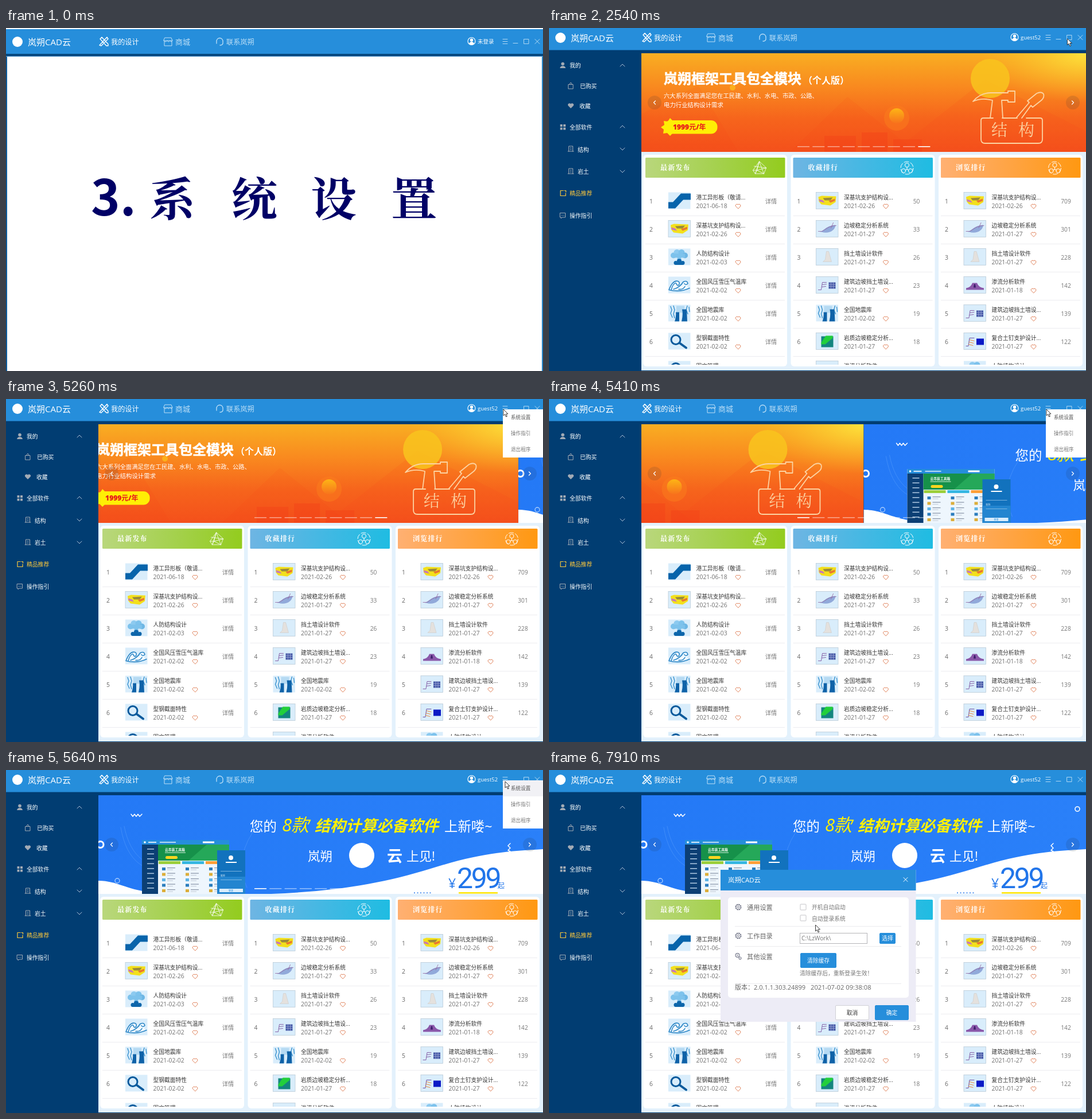
Recreate the animation shown at these times as an HTML page. Size 936 by 598 pixels, loop 7.99 s.

```html
<!DOCTYPE html>
<html lang="zh-CN">
<head>
<meta charset="utf-8">
<title>系统设置</title>
<style>
html, body { margin: 0; width: 100%; height: 100%; overflow: hidden; background: #fff; }
svg { display: block; font-family: "Open Sans", "Noto Sans CJK SC", sans-serif; }
.song { font-family: "Noto Serif CJK SC", "Noto Sans CJK SC", serif; }
.line { fill: none; stroke-linecap: round; stroke-linejoin: round; }
</style>
</head>
<body>
<svg id="stage" width="936" height="598" viewBox="0 0 936 598"></svg>
<script>
const LOOP = 7990, BRAND = '岚朔', BLUE = '#268edb', NAVY = '#013d72', PALE = '#bfe0f7';

const text = (x, y, s, size, fill, extra = '') =>
  `<text x="${x}" y="${y}" font-size="${size}" fill="${fill}" ${extra}>${s}</text>`;
const rect = (x, y, w, h, fill, extra = '') =>
  `<rect x="${x}" y="${y}" width="${w}" height="${h}" fill="${fill}" ${extra}/>`;
const disc = (x, y, r, fill, extra = '') => `<circle cx="${x}" cy="${y}" r="${r}" fill="${fill}" ${extra}/>`;
const ring = (x, y, r, color, w = 1) => disc(x, y, r, 'none', `stroke="${color}" stroke-width="${w}"`);
const area = (d, fill, extra = '') => `<path d="${d}" fill="${fill}" ${extra}/>`;
const line = (d, color, w = 1) => `<path class="line" d="${d}" stroke="${color}" stroke-width="${w}"/>`;
const group = (id, body) => `<g id="${id}">${body}</g>`;
const at = (x, y, body) => `<g transform="translate(${x} ${y})">${body}</g>`;
const clip = (x, y, w, h, body) => `<svg x="${x}" y="${y}" width="${w}" height="${h}" viewBox="${x} ${y} ${w} ${h}">${body}</svg>`;
const gradient = (id, stops, dir = 'x2="1" y2="0"') => `<linearGradient id="${id}" ${dir}>` +
  stops.map((c, i) => `<stop offset="${i / (stops.length - 1)}" stop-color="${c}"/>`).join('') + '</linearGradient>';
const MID = 'text-anchor="middle"', BOLD = 'font-weight="700"', MEDIUM = 'font-weight="500"', BLACK = 'font-weight="900"';

const defs = '<defs>' +
  gradient('h0', ['#b9d77c', '#a5d14f', '#93cc1e']) +
  gradient('h1', ['#6eb5e3', '#45b8e3', '#1fbce2']) +
  gradient('h2', ['#ffb072', '#ffa443', '#ff9811']) +
  gradient('sunset', ['#f9ae22', '#f98a1f', '#f6641c', '#f4501b'], 'x2="0" y2="1"') +
  gradient('sea', ['#2479f6', '#2a80f9']) +
  gradient('ball', ['#fdb515', '#f7741c'], 'x2="0" y2="1"') +
  `<radialGradient id="glow" cx="1" cy="0" r=".5"><stop stop-color="#fde23c"/>
   <stop offset="1" stop-color="#fbc52a" stop-opacity="0"/></radialGradient></defs>`;

// Title bar, shared by both scenes
const header = user =>
  disc(20, 17, 9, '#fff') +
  text(38, 23, BRAND + 'CAD云', 15, '#fff', MEDIUM) +
  line('M164 12L167 9L178 21V24H175ZM163 23L176 9L178 12L166 24Z', '#fff', 1.4) +
  text(183, 21.5, '我的设计', 12.2, '#fff', MEDIUM) +
  line('M277 10H288L290 15H275ZM276 16V24H289V16M275 15Q278 19 281 15Q283 19 286 15Q288 19 290 15', PALE) +
  text(295, 21.5, '商城', 13, PALE) +
  line('M367 18V16A5.5 5.5 0 0 1 378 16V18M367 15V20M378 15V20Q377 23 373 23', PALE, 1.3) +
  text(384, 21.5, '联系' + BRAND, 12.2, PALE) +
  ring(811.5, 16, 6.5, '#fff', 1.2) + disc(811.5, 14, 2.7, '#fff') + area('M807 21Q808 17 811.5 17T816 21Q811 24 807 21', '#fff') +
  text(822, 20, user, 9.5, '#fff') +
  line('M866 12.5H874M866 16.5H874M866 20.5H874M884 19.5H892M903 12.5H911V20.5H903ZM922 12.5L930 20.5M930 12.5L922 20.5', PALE, .9);

const INDIGO = '#000066';
const intro = rect(0, 0, 936, 598, '#fff') + rect(0, 2, 936, 43, BLUE) + rect(0, 45, 936, 4, '#04487f') +
  rect(0, 49, 2, 549, '#0d5c9c') + rect(934, 49, 2, 549, '#2b86c8') + rect(0, 49, 936, 1, '#5b9dd0') +
  at(0, 7, header('未登录')) +
  text(148, 327, '3.', 86, INDIGO, `${BOLD} style="font-family:'Noto Sans CJK SC',sans-serif"`) +
  [...'系统设置'].map((c, i) => text([290, 433, 571, 711][i], 327, c, 80, INDIGO, `${MID} font-weight="600" class="song"`)).join('');

// Sidebar
const chevron = (y, up) => line(up ? `M124 ${y + 2}L128 ${y - 2}L132 ${y + 2}` : `M124 ${y - 2}L128 ${y + 2}L132 ${y - 2}`, '#a9c0d5');
const GREY = '#a3abb5', GOLD = '#ffc83c';
const building = y => line(`M34.5 ${y + 4}V${y - 5}H41.5V${y + 4}M33 ${y + 4}H43M37 ${y - 2}H39M37 ${y + 1}H39`, GREY);
const sidebar = rect(0, 38, 936, 560, NAVY) +
  [[36, 65, '我的'], [54, 101, '已购买'], [53, 136, '收藏'], [36, 173, '全部软件'], [50, 212, '结构'],
   [50, 250, '岩土'], [36, 288, '精品推荐', GOLD], [36, 327, '操作指引']]
    .map(([x, y, s, c = '#fff']) => text(x, y + 3.5, s, 9.8, c, MEDIUM)).join('') +
  chevron(65, true) + chevron(172, true) + chevron(211) + chevron(250) +
  disc(24, 62.5, 2.8, GREY) + area('M19 70Q20 66 24 66T29 70Z', GREY) +
  line('M34 98.5H42V106H34ZM36 98Q38 92 40 98', GREY) +
  area('M38 140L33.5 135.5A2.6 2.6 0 0 1 38 132.5A2.6 2.6 0 0 1 42.5 135.5Z', GREY) +
  [19.5, 25].map(x => [168, 173.5].map(y => rect(x, y, 4, 4, GREY)).join('')).join('') +
  building(211) + building(250) +
  line('M25 283.5H20V292.5H29V288M27 283.5H29.5V286', GOLD, 1.2) +
  line('M19.5 322.5H28.5V330H23L21 332V330H19.5ZM22 326.5H22.2M24 326.5H24.2M26 326.5H26.2', GREY);

// Ranking cards
const thumbs = {
  beam: area('M39 2H22L8 17H0V28H12L26 13H39Z', '#0764ab'),
  pit: area('M4 8L10 6L35 7L34 17L25 23L9 21L5 16Z', '#f3e01c') + area('M12 10L29 9L25 14L15 14Z', '#9a8a3a') +
    area('M5 12L12 14L15 18L6 16Z', '#c877b8') + area('M22 15L33 11L33 15L25 18Z', '#e9792f'),
  blast: disc(9, 12, 5, '#7dc2ec') + disc(15, 7, 5.5, '#8ccaf0') + disc(23, 7, 5.5, '#7dc2ec') + disc(29, 12, 5, '#6db6e4') +
    rect(9, 9, 20, 7, '#7dc2ec') + area('M16 15H22L23 22H15Z', '#7dc2ec') +
    disc(13, 25, 3.5, '#0d66ab') + disc(19, 22, 4, '#0d66ab') + disc(25, 25, 3.5, '#0d66ab') + rect(12, 24, 14, 4.5, '#0d66ab'),
  wave: area('M1 23Q8 5 17 8Q22 11 18 16Q27 16 28 9Q33 6 35 12Q30 17 37 21Q20 27 1 23Z', '#f1f9ff') +
    line('M1 23Q8 5 17 8Q21 10 18 15Q15 16 14 12M5 23Q8 12 13 11M9 22Q20 19 26 9Q33 6 34 12Q30 16 28 12M1 23Q20 28 37 20M18 22Q26 23 29 17', '#2b86c6', 1.6),
  quake: line('M4 3L6 9L4 15L7 22M9 2L11 9L9 16L11 23M33 2L31 9L34 16M36 4L37 12', '#3b93cf', 1.4) +
    area('M14 2H28V14H14Z', '#b5daf3') + area('M13 13H19V29H11Q14 21 13 13ZM24 8H32L33 29H23Q26 18 24 8Z', '#0f62a8'),
  lens: ring(13, 12, 8, '#0a5a9c', 3) + line('M20 18L31 26', '#0a5a9c', 4),
  slope: area('M5 20C13 20 16 9 34 8C33 18 22 24 9 20Z', '#91a9da') + line('M4 19H10C17 16 22 9 35 9M26 13L30 4', '#94639c', .8),
  wall: area('M18 5H22L27 23H12L16 19Z', '#e4e1de', 'stroke="#c9c4c0" stroke-width=".5"'),
  chart: line('M4 23H9L11 10H18M11 14L18 13M10 18L17 17', '#8863a8') + rect(22, 10, 12, 11, '#465aa8') +
    line('M22 13.5H34M22 17H34M26 10V21M30 10V21', '#a9b4dc', .7),
  rock: rect(9, 6, 21, 19, '#14857f') + area('M9 17L17 5H29V9L16 20H9Z', '#22cf3b'),
  hill: area('M4 20Q12 19 15 11H23Q26 19 35 20V23H4Z', '#8a58aa') + area('M18 13H20L21 19H17Z', '#3b1d6b'),
  nail: line('M4 23H8L10 9H18', '#6f51a3') + line('M10 12L18 14M9 16L17 18M8 20L16 22', '#ea8b3b') + rect(22, 10, 13, 11, '#0b19c6')
};
const PIT = '深基坑支护结构设...|02-26|pit|', SLOPE = '边坡稳定分析系统|01-27|slope|', WALL = '挡土墙设计软件|01-27|wall|',
  CHART = '建筑边坡挡土墙设...|01-27|chart|', QUAKE = '全国地震库|02-02|quake|', HILL = '渗流分析软件|01-18|hill|', BLAST = '人防结构设计|02-03|blast|';
const MORE = '详情';
const cards = [
  ['最新发布', 387, ['港工异形板（敬请...|06-18|beam|' + MORE, PIT + MORE, BLAST + MORE, '全国风压雪压气温库|02-02|wave|' + MORE,
    QUAKE + MORE, '型钢截面特性|02-02|lens|' + MORE, '图文管理|02-02|lens|']],
  ['收藏排行', 640.5, [PIT + 50, SLOPE + 33, WALL + 26, CHART + 23, QUAKE + 19, '岩质边坡稳定分析...|01-27|rock|18', HILL]],
  ['浏览排行', 901, [PIT + 709, SLOPE + 301, WALL + 228, HILL + 142, CHART + 139, '复合土钉支护设计...|01-27|nail|122', BLAST]]
];
const heart = (x, y) => line(`M${x} ${y + 4.3}L${x - 4.3} ${y}A2.6 2.6 0 0 1 ${x} ${y - 2.6}A2.6 2.6 0 0 1 ${x + 4.3} ${y}Z`, '#e08058');
const meshIcon = line('M0 -11L-11 4L-7 10L8 10L12 0ZM0 -11L-4 4L8 10M0 -11L8 10M12 0L-4 4L-11 4M-4 4L-7 10M-7 10L0 -11M-9 -3L12 0', '#fff', .8);
const peopleIcon = ring(0, -5, 3.6, '#fff') + ring(-6, 5, 3.6, '#fff') + ring(6, 5, 3.6, '#fff') + line('M0 -1V3M-3 4L0 2L3 4', '#fff') +
  disc(0, 0, 11, 'none', 'stroke="#fff" stroke-dasharray="9 2.5"');

const row = (data, i, x, valueX) => {
  const [title, date, thumb, value] = data.split('|'), y = 302 + 49 * i;
  return text(x + 14, y + 4, i + 1, 10.4, '#666', MID) +
    at(x + 44, y - 15.5, rect(0, 0, 38.5, 29, '#d9edfb', /beam|blast|wave|quake|lens/.test(thumb) ? '' : 'stroke="#b9cad8" stroke-width=".8"') + thumbs[thumb]) +
    text(x + 92.5, y - 3.5, title, 9.75, '#333') + text(x + 92.5, y + 12, '2021-' + date, 10.4, '#707070') +
    heart(x + 165.5, y + 8.5) + text(valueX, y + 4, value, 10.2, '#777', MID) + rect(x + 4, y + 25, 243, 1, '#ececf0');
};
const lists = rect(161, 216, 775, 381, '#e3f1fc') + cards.map(([title, valueX, rows], k) => {
  const x = 164 + 257.5 * k;
  return rect(x, 221, 251, 369, '#fff', 'rx="6"') + rect(x + 4, 226, 243.5, 35, `url(#h${k})`, 'rx="1.5"') +
    text(x + 30, 248, title, 12, '#fff', `${BOLD} class="song" letter-spacing="1.2"`) + at(x + 202.5, 244, k ? peopleIcon : meshIcon) +
    clip(x, 262, 250, 325, rows.map((data, i) => row(data, i, x, valueX)).join(''));
}).join('');

// Carousel
const CREAM = '#fcd3a2';
const orange = rect(161, 44, 775, 172, 'url(#sunset)') + rect(561, 44, 375, 172, 'url(#glow)') +
  area('M161 150L260 100L330 216H161ZM420 216L520 120L640 216Z', '#f23a16', 'opacity=".08"') +
  area('M480 188H535V216H480ZM545 182H590V216H545ZM600 194H650V216H600Z', '#ee3314', 'opacity=".25"') +
  area('M600 216L760 90L936 180V216Z', '#f0431a', 'opacity=".12"') +
  disc(769, 88, 34, '#fac51e', 'opacity=".85"') + disc(606, 157, 22, '#fb7f1c', 'opacity=".5"') + disc(606, 153, 13, 'url(#ball)') + disc(320, 104, 5, '#fcb01c') +
  text(200, 97, BRAND + '框架工具包全模块', 24, '#fff', `${BLACK} stroke="#fff" stroke-width=".6"`) + text(443, 97, '（个人版）', 16, '#fff', BOLD) +
  text(200, 121.5, '六大系列全面满足您在工民建、水利、水电、市政、公路、', 10.35, '#fff') +
  text(200, 137.5, '电力行业结构设计需求', 10.4, '#fff') +
  rect(201, 161, 92.5, 23.5, '#ffee05', 'rx="11"') + area('M195 173L201 169L200 162L207 163L211 157L217 163V182L211 188L206 183L199 184L200 177Z', '#ffee05') +
  text(216, 177, '1999元/年', 12, '#e8141c', BLACK) +
  line('M774 157H757Q753 157 753 161V194Q753 201 760 201H853Q860 201 860 194V161Q860 157 856 157H832M790 157H816', CREAM, 1.8) +
  line('M739 128Q752 113 770 113H800V110H812V129H800V126H789L791 157M769 157L773 126Q755 121 739 128M815 156L837 130L834 127L850 114Q858 110 862 115Q864 122 857 127L843 138L840 135L824 157', CREAM, 1.8) +
  text(771, 188, '结', 28, CREAM, 'class="song"') + text(818, 188, '构', 28, CREAM, 'class="song"');

const miniList = (x, color) => rect(x, 159, 38, 5, color) + [0, 1, 2, 3, 4].map(i =>
  rect(x + 6, 170 + i * 9.5, 6, 5, ['#2b7dbd', '#dcae3a', '#5fb4e6'][i % 3]) + rect(x + 15, 170 + i * 9.5, 14, 1.2, '#8793a5') + rect(x + 15, 173.5 + i * 9.5, 10, 1, '#c2cad4')).join('');
const miniApp = rect(237, 122, 152, 94, '#eef6fd') + rect(237, 122, 152, 8, BLUE) + rect(237, 130, 28, 86, '#0c3f74') +
  [...Array(9)].map((_, i) => rect(246, 137 + i * 8.5, 12, 1.6, '#a9c4de')).join('') + rect(343, 124.5, 20, 3, '#fff') +
  disc(242, 126, 1.8, '#fff') + rect(248, 125, 14, 2, '#d6eafa') + rect(268, 125, 28, 2, '#b5d9f5') +
  rect(265, 130, 124, 28, '#16914a') + area('M318 158L350 130H389V158Z', '#25a859') +
  text(277, 140.5, '云吊装工具箱', 5.8, '#fff', BOLD) + rect(277, 143.5, 36, 1.2, '#bde5cc') + rect(278, 150, 21, 5, '#ffd51f', 'rx="2.5"') +
  miniList(266, '#9ccf3b') + miniList(307, '#36b7e2') + miniList(348, '#ff9f38') +
  rect(368, 140, 49, 76, '#1272bd') + rect(368, 186, 49, 30, '#2385d0') + disc(392, 153, 4, '#fff') + rect(383, 160, 19, 2, '#fff') +
  rect(374, 176, 37, .8, '#8fc1e8') + text(374, 186, '昵称', 4, '#d7ebfa') + rect(374, 191, 37, .8, '#8fc1e8') +
  rect(372, 207, 41, 6, '#d9edfc') + text(392, 211.7, '登录', 4, BLUE, MID);
const YELLOW = '#fff000', INK = '#2175ea';
const blue = rect(161, 44, 775, 172, 'url(#sea)') +
  line('M200 100Q215 190 300 175M420 205Q395 150 440 95M206 98Q222 180 300 168', '#4b95fb', .7) +
  area('M161 193C205 194 205 214 300 217H161ZM430 217C560 214 650 200 740 172S870 142 936 138V217Z', '#fff') +
  miniApp + ring(164.5, 130, 5.5, '#fff', 3) + ring(194, 193, 4, '#a9cdfd', 1.3) + ring(921, 68, 4, '#fff', 1.6) +
  line('M218 77L221 81L224 77L227 81L230 77L233 81L237 77', '#fff', 1.5) + line('M879 128L875 132L879 136L875 140L879 142', '#fff', 1.5) +
  text(425, 107, '您的', 23.4, '#fff') + text(481, 107, '8款', 31, YELLOW, 'font-style="italic" letter-spacing="-1"') +
  text(538, 107, '结构计算必备软件', 27, YELLOW, `font-style="italic" ${BLACK}`) + text(764, 107, '上新喽~', 23.4, '#fff') +
  text(526, 158, BRAND, 21.5, '#fff') + disc(620, 149, 22, '#fff') +
  text(664, 160, '云', 27, '#fff', BLACK) + text(698, 158, '上见!', 22, '#fff') +
  text(771, 206, '¥', 23, INK) + text(786, 206, '299', 50, INK, 'letter-spacing="-3.4" style="font-family:Roboto,sans-serif"') +
  text(857, 206, '起', 12, INK) + rect(789, 213, 68, 2.5, '#ffe500') +
  [0, 1, 2, 3, 4, 5].map(i => rect(711 + i * 5.5, 213.5, 2, 1.5, INK)).join('');
const arrow = (x, dir) => disc(x, 130, 12, '#1f2d3d', 'opacity=".13"') + line(`M${x - dir * 1.5} 127L${x + dir * 1.5} 130L${x - dir * 1.5} 133`, '#fff', 1.2);
const slide = body => clip(161, 44, 775, 172, body);
const carousel = slide(group('slideA', slide(orange)) + group('slideB', slide(blue)) + arrow(184, -1) + arrow(913, 1) +
  group('dots', [...Array(9)].map((_, i) => rect(433 + i * 26.3, 206, 21, 1.6, '#fff')).join('')));

// Overlays
const tooltip = rect(868, 33, 42, 15, '#000', 'opacity=".2"') + rect(866.5, 30.5, 41.5, 15, '#fff', 'stroke="#767676"') + text(870, 41.3, '系统设置', 8.6, '#222');
const menu = rect(866, 18, 70, 84, '#fff') + rect(866, 18, 70, 28, '#f1f1f5', 'id="hover"') +
  text(880, 35, '系统设置', 8.6, '#555') + text(880, 63, '操作指引', 8.6, '#777') + text(880, 90.5, '退出程序', 8.6, '#777');

const gear = y => disc(330, y, 4.8, 'none', 'stroke="#777a8c" stroke-width="1.4" stroke-dasharray="2.6 1.1"') + ring(330, y, 4, '#777a8c', .8) + ring(330, y, 1.7, '#777a8c', .9);
const button = (x, y, w, h, s, fill, ink, edge = fill) =>
  rect(x, y, w, h, fill, `rx="1.5" stroke="${edge}"`) + text(x + w / 2, y + h / 2 + 3.6, s, 9.8, ink, MID);
const dialog = rect(299, 174, 340.5, 265, '#edecf6') + rect(299, 174, 340.5, 36, BLUE) +
  text(312, 195.5, BRAND + 'CAD云', 11.4, '#fff') + line('M618 187.5L625 194.5M625 187.5L618 194.5', '#fff') +
  rect(312, 222, 315, 175, '#fff', 'rx="5"') + gear(239) + gear(289) +
  ring(328.5, 323, 3.4, '#777a8c', 1.2) + ring(328.5, 323, 1, '#777a8c', .8) + ring(333, 328, 2, '#777a8c', 1.1) +
  ['通用设置', '工作目录', '其他设置'].map((s, i) => text(345, [244, 294, 329.5][i], s, 11.2, '#666')).join('') +
  [272, 307, 372].map(y => rect(324, y, 290, 1, '#ebebee')).join('') +
  ['开机自动启动', '自动登录系统'].map((s, i) => rect(438, 234 + 19 * i, 10, 10, '#fff', 'rx="1" stroke="#c4c4c8"') + text(458, 243 + 19.5 * i, s, 9.8, '#777')).join('') +
  rect(437.5, 284.5, 117, 18, '#fff', 'stroke="#b5b5b8"') + text(440, 297, 'C:\\LzWork\\', 10.2, '#777') +
  button(576.5, 284.5, 27, 18, '选择', BLUE, '#fff') + button(438.5, 319.5, 62, 25, '清除缓存', BLUE, '#fff') +
  text(437, 358, '清除缓存后，重新登录生效！', 9.8, '#777') +
  text(324, 382.5, '版本：2.0.1.1.303.24899', 11, '#666') + text(456, 382.5, '2021-07-02 09:38:08', 11.2, '#666') +
  button(499.5, 410.5, 58, 25, '取消', '#fff', '#333', '#d0d0d6') + button(568.5, 410.5, 58, 25, '确定', BLUE, '#fff');
const pointer = area('M0 0V11L2.6 8.7L4.6 13L6.4 12.2L4.5 8H8Z', '#fff', 'stroke="#222" stroke-width=".9"');

const $ = id => document.getElementById(id);
$('stage').innerHTML = defs + group('app', sidebar + rect(0, 0, 936, 38.5, BLUE) + header('guest52') + lists + carousel +
  group('tooltip', tooltip) + group('menu', menu) + group('dialog', dialog) +
  group('click', ring(0, 0, 8, '#e8433a', 1)) + group('pointer', pointer)) + group('intro', intro);

// Pointer path: time, x, y
const path = [[1770, 674, 585], [1830, 916, 278], [2280, 920, 20], [2850, 862, 15], [2990, 861, 14], [3150, 867, 18],
  [5560, 867, 18], [5635, 870, 20], [6110, 886, 33], [7000, 886, 33], [7880, 464.5, 270]];
const clamp = v => Math.min(1, Math.max(0, v));
const ease = p => (1 - Math.cos(Math.PI * clamp(p))) / 2;
const between = (t, a, b) => t >= a && t < b;
const show = (id, on) => { $(id).style.display = on ? '' : 'none'; };
const move = (id, x, y = 0) => $(id).setAttribute('transform', `translate(${x} ${y})`);

function pointerAt(t) {
  if (t >= path.at(-1)[0]) return path.at(-1).slice(1);
  const i = Math.max(1, path.findIndex(k => k[0] > t));
  const [a, b] = [path[i - 1], path[i]], p = ease((t - a[0]) / (b[0] - a[0]));
  return [a[1] + (b[1] - a[1]) * p, a[2] + (b[2] - a[2]) * p];
}

function draw(now) {
  const t = now % LOOP;
  const tick = Math.floor((t - 10) / 75) * 75 + 10;
  const shift = 775 * ease((tick - 5195) / 430);
  const flick = between(t, 1770, 1890);
  const [x, y] = pointerAt(flick ? t : tick);

  show('intro', t < 1440);
  show('tooltip', between(t, 3710, 5010));
  show('menu', between(t, 5010, 6800));
  $('menu').setAttribute('opacity', t < 5100 ? .6 : 1);
  show('hover', tick >= 5560);
  show('dialog', t >= 6800);
  show('click', between(t, 4850, 5010) || between(t, 6510, 6600));
  show('pointer', flick || t >= 2300);
  move('slideA', -shift);
  move('slideB', 775 - shift);
  move('pointer', x, y);
  move('click', x, y);
  const active = tick < 5335 ? 8 : 0;
  [...$('dots').children].forEach((d, i) => d.setAttribute('opacity', i === active ? 1 : .48));
  requestAnimationFrame(() => draw(performance.now() - start));
}
const start = performance.now();
draw(0);
</script>
</body>
</html>
```
